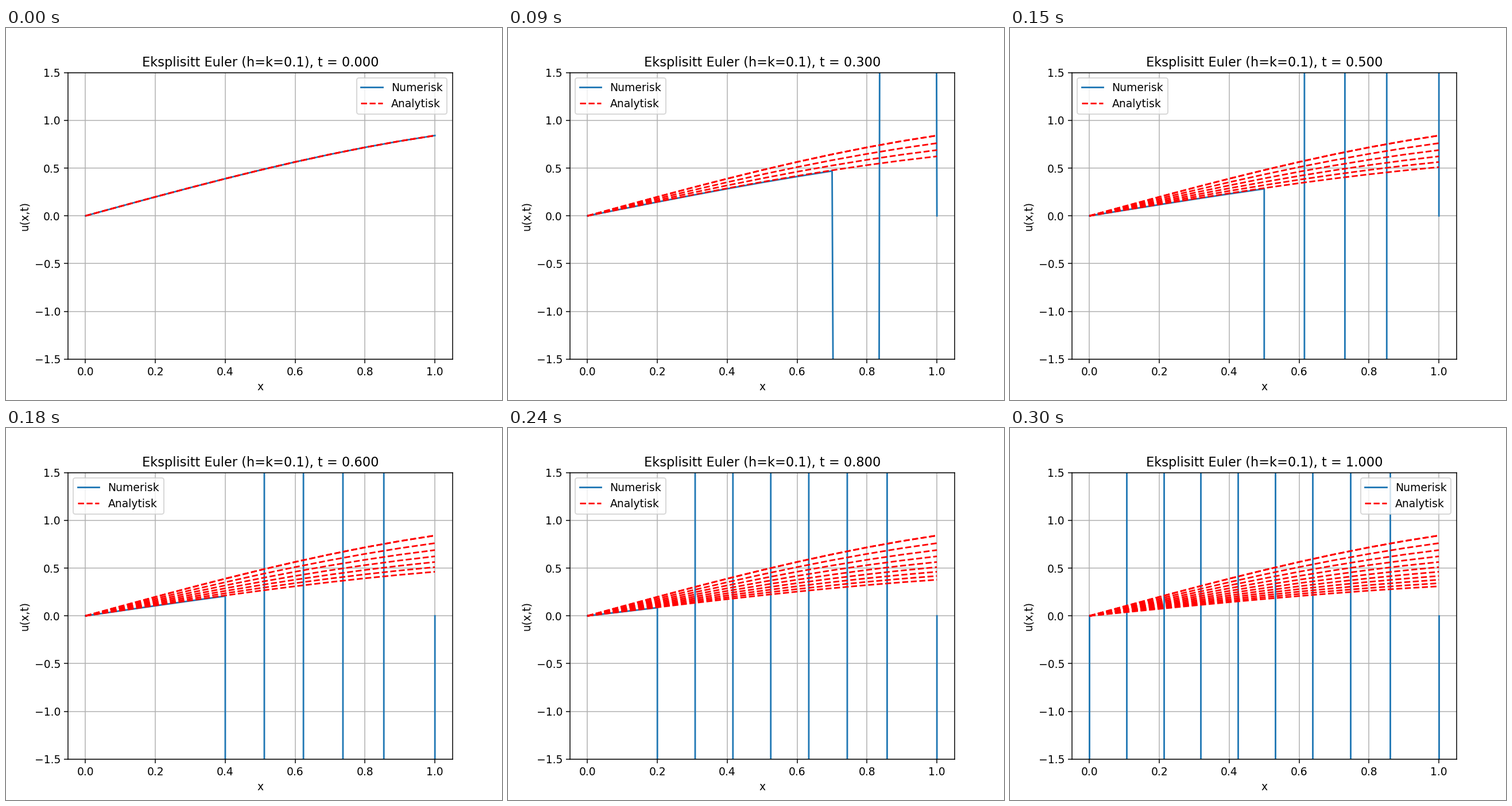
A matplotlib script that plays this animation: 864 px wide and 648 px high, repeating every 330 ms.

```python
import numpy as np
import matplotlib.pyplot as plt
from matplotlib.animation import FuncAnimation

H = K = 0.1
STEPS = 11

x = np.linspace(0, 1, 11)
times = K * np.arange(STEPS)


def solve():
    """Explicit Euler for u_t = u_xx with zero boundary values."""
    u = np.sin(x)
    rows = [u]
    for _ in range(STEPS - 1):
        new = np.zeros_like(u)
        new[1:-1] = u[1:-1] + K / H**2 * (u[2:] - 2 * u[1:-1] + u[:-2])
        u = new
        rows.append(u)
    return rows


def exact(t):
    return np.exp(-t) * np.sin(x)


numeric = solve()

fig, ax = plt.subplots(figsize=(6.4, 4.8), dpi=135)
ax.set(xlim=(-0.05, 1.05), ylim=(-1.5, 1.5), xlabel="x", ylabel="u(x,t)")
ax.grid(True)
title = ax.set_title("")

num_line, = ax.plot(x, numeric[0], label="Numerisk")
# The starting curve is drawn twice, which makes it slightly heavier.
ax.plot(x, exact(0), "r--", label="Analytisk")
trail = [ax.plot(x, exact(t), "r--")[0] for t in times]
ax.legend(loc="best")


def update(i):
    num_line.set_ydata(numeric[i])
    for k, line in enumerate(trail):
        line.set_visible(k <= i)
    title.set_text(f"Eksplisitt Euler (h=k={H}), t = {times[i]:.3f}")
    return [num_line, title, *trail]


anim = FuncAnimation(fig, update, frames=STEPS, interval=30,
                     init_func=lambda: update(0), repeat=True,
                     repeat_delay=0, blit=False)
plt.show()
```
